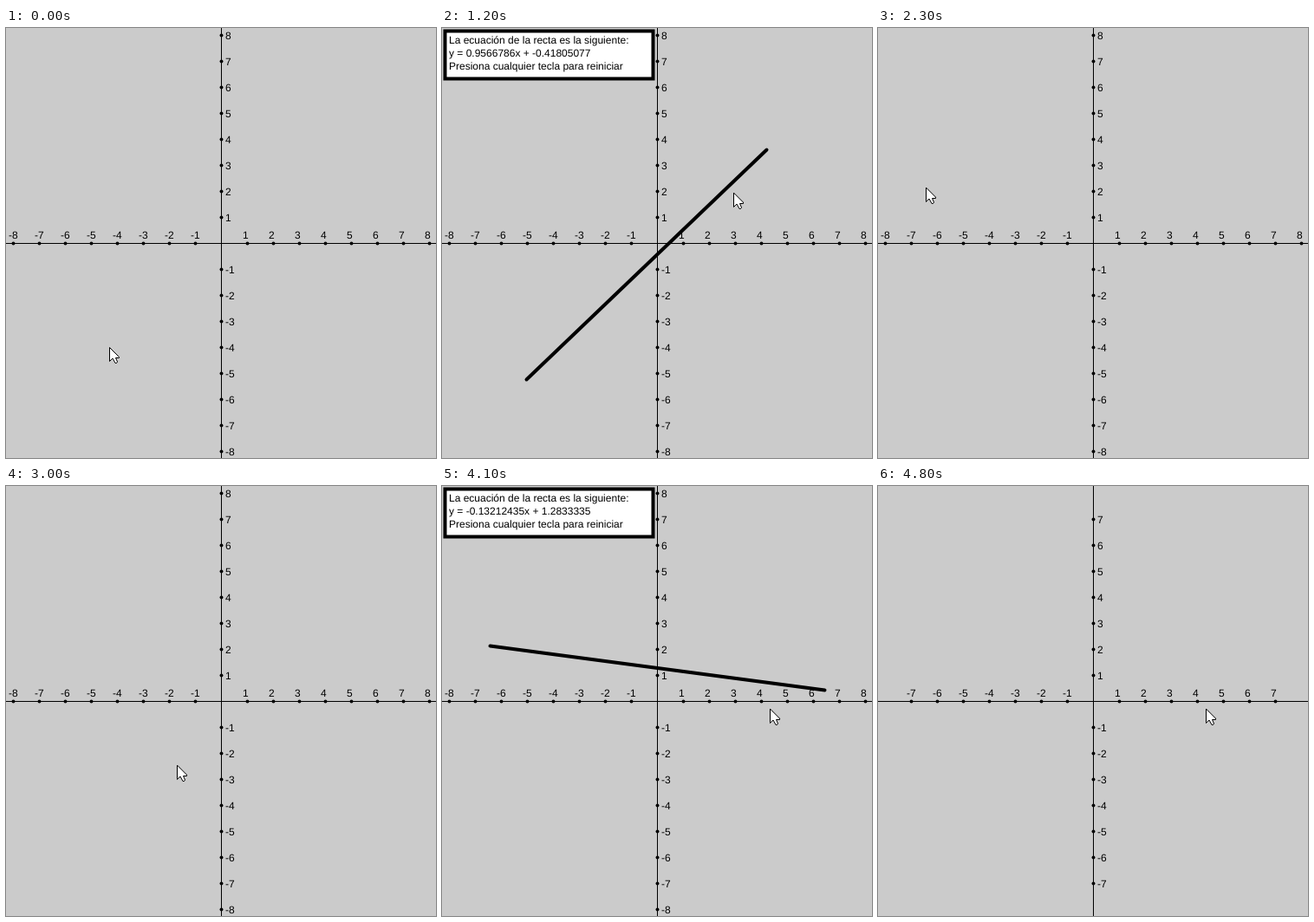
Animation of 496 by 496 pixels, one loop 4.9 s. Source, as an HTML page with a canvas:

```html
<!DOCTYPE html>
<html lang="es">
<head>
<meta charset="utf-8">
<style>
  html, body { margin: 0; width: 100%; height: 100%; overflow: hidden; background: #cbcbcb; }
  canvas { display: block; }
</style>
</head>
<body>
<canvas id="stage" width="496" height="496"></canvas>
<script>
const ctx = document.getElementById('stage').getContext('2d');
const SIZE = 496, ORIGIN = SIZE / 2, UNIT = 30, MAX_TICK = 8;
const LOOP = 4900, STEP = 100, TICKS_PER_STEP = 3;

const point = (x, y) => ({ x, y });

// Each segment joins two clicked points and stays until the drawing is reset.
const rising = {
  shown: 800, reset: 1700, a: point(97, 405), b: point(374, 140),
  equation: 'y = 0.9566786x + -0.41805077'
};
const falling = {
  shown: 3700, reset: 4600, a: point(55, 184), b: point(441, 235),
  equation: 'y = -0.13212435x + 1.2833335'
};

// Pointer moves; bend bows the way sideways, as a share of its length.
const home = point(119, 368);
const moves = [
  { from: 0, until: 200, to: rising.a },
  { from: 200, until: 700, to: rising.b },
  { from: 1000, until: 1600, to: point(222, 213), bend: -0.19 },
  { from: 1600, until: 1700, to: point(214, 211) },
  { from: 1700, until: 2300, to: falling.a },
  { from: 2600, until: 2900, to: point(200, 469), bend: 0.3 },
  { from: 2900, until: 3200, to: point(410, 196), bend: -0.3 },
  { from: 3200, until: 3500, to: falling.b },
  { from: 3900, until: 4100, to: point(378, 257) }
];

function pointerAt(t) {
  let at = home;
  for (const { from, until, to, bend = 0 } of moves) {
    if (t <= from) break;
    const k = Math.min(1, (t - from) / (until - from));
    const bow = 4 * bend * k * (1 - k);
    const dx = to.x - at.x, dy = to.y - at.y;
    at = point(at.x + dx * k - dy * bow, at.y + dy * k + dx * bow);
  }
  return point(Math.round(at.x), Math.round(at.y));
}

// Ticks appear outwards from the origin; the second reset is one tick ahead.
function tickCount(t) {
  if (t < rising.reset) return MAX_TICK;
  const [reset, first] = t < falling.reset ? [rising.reset, 0] : [falling.reset, 1];
  return Math.min(MAX_TICK, first + TICKS_PER_STEP * (t - reset) / STEP);
}

function dot(x, y) {
  ctx.beginPath();
  ctx.arc(x + 0.5, y + 0.5, 2, 0, Math.PI * 2);
  ctx.fill();
}

function drawAxes(count) {
  if (!count) return;
  ctx.fillRect(ORIGIN, 0, 1, SIZE);
  ctx.fillRect(0, ORIGIN, SIZE, 1);
  for (let n = -count; n <= count; n++) {
    if (!n) continue;
    const x = ORIGIN + n * UNIT, y = ORIGIN - n * UNIT;
    dot(x, ORIGIN);
    dot(ORIGIN, y);
    ctx.fillText(n, x - 5, ORIGIN - 5);
    ctx.fillText(n, ORIGIN + 5, y + 5);
  }
}

function drawSegment({ a, b, equation }) {
  ctx.lineWidth = 4;
  ctx.lineCap = 'round';
  ctx.beginPath();
  ctx.moveTo(a.x + 0.5, a.y + 0.5);
  ctx.lineTo(b.x + 0.5, b.y + 0.5);
  ctx.stroke();

  ctx.fillStyle = '#fff';
  ctx.fillRect(3, 3, 241, 56);
  ctx.strokeRect(3.5, 3.5, 240, 55);
  ctx.fillStyle = '#000';
  const lines = ['La ecuación de la recta es la siguiente:', equation, 'Presiona cualquier tecla para reiniciar'];
  lines.forEach((line, i) => ctx.fillText(line, 8, 18 + i * 15));
}

const arrow = new Path2D('M.5 .5V16.5L4 13L7 18.5H8.5L9.5 17L7.5 12.5H11.5V11.5Z');

function drawPointer({ x, y }) {
  ctx.save();
  ctx.translate(x, y);
  ctx.fillStyle = '#fff';
  ctx.lineWidth = 1;
  ctx.fill(arrow);
  ctx.stroke(arrow);
  ctx.restore();
}

function draw(now) {
  const t = Math.floor(now % LOOP / STEP) * STEP;
  ctx.fillStyle = '#cbcbcb';
  ctx.fillRect(0, 0, SIZE, SIZE);
  ctx.fillStyle = ctx.strokeStyle = '#000';
  ctx.font = '12px "Liberation Sans", Arial, sans-serif';
  ctx.textRendering = 'geometricPrecision';
  drawAxes(tickCount(t));
  for (const segment of [rising, falling]) {
    if (t >= segment.shown && t < segment.reset) drawSegment(segment);
  }
  drawPointer(pointerAt(t));
}

const start = performance.now();
function frame() {
  draw(performance.now() - start);
  requestAnimationFrame(frame);
}
frame();
</script>
</body>
</html>
```
